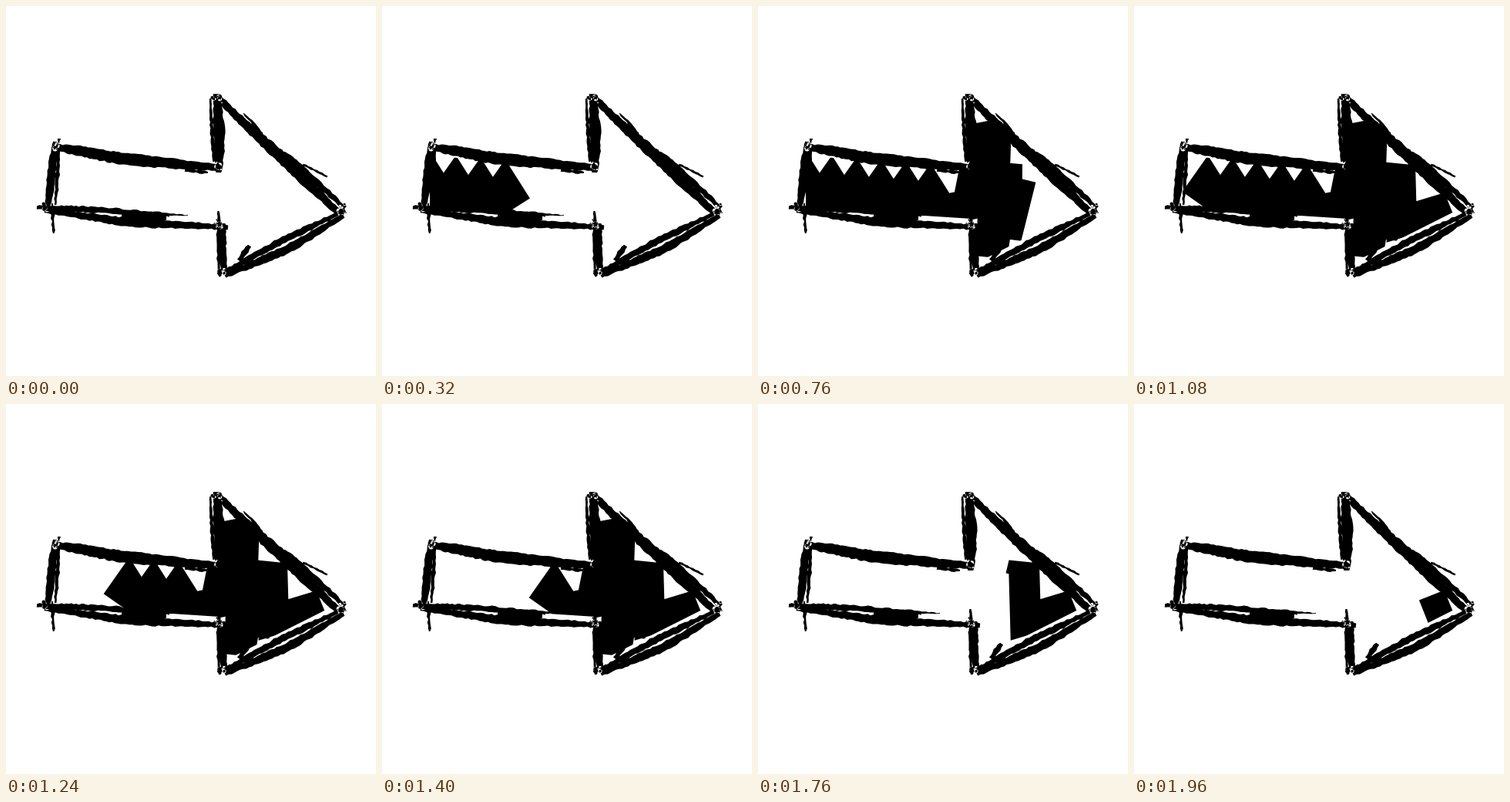
Recreate the animation shown at these times as an HTML page with a canvas. Size 480 px wide and 480 px high, loop 2000 ms.

```html
<!DOCTYPE html>
<html>
<head>
<meta charset="utf-8">
<style>
html, body { margin: 0; width: 100%; height: 100%; overflow: hidden; background: #fff; }
canvas { display: block; }
</style>
</head>
<body>
<canvas id="stage" width="480" height="480"></canvas>
<script>
const ctx = document.getElementById('stage').getContext('2d');
let seed = 7;
const rand = () => (seed = seed * 16807 % 2147483647) / 2147483647;
const spread = r => (rand() + rand() - 1) * r;
const parse = s => s.split(' ').map(p => p.split(',').map(Number));
const mix = (a, b, k) => a.map((v, i) => v + (b[i] - v) * k);

const ink = new Path2D();

// Rough brush mark along a bent line, widest in its middle
function brush(text, width) {
  const [a, b, c] = parse(text);
  const mid = c ? b : mix(a, b, .5), end = c || b;
  const length = Math.hypot(end[0] - a[0], end[1] - a[1]);
  const nx = (a[1] - end[1]) / length, ny = (end[0] - a[0]) / length;
  const n = Math.ceil(length / 4), near = [], far = [];
  for (let i = 0; i <= n; i++) {
    const s = i / n;
    const [x, y] = s < .5 ? mix(a, mid, s * 2) : mix(mid, end, s * 2 - 1);
    const half = width * (.3 + .25 * Math.sin(Math.PI * s));
    const p = half + spread(1.2), q = half + spread(1.2);
    near.push([x + nx * p, y + ny * p]);
    far.unshift([x - nx * q, y - ny * q]);
  }
  const mark = new Path2D();
  for (const p of near.concat(far)) mark.lineTo(...p);
  mark.closePath();
  ink.addPath(mark);
}

// Tail
brush('64,176 59,220 54,266', 10);
brush('69,172 67,215 64,258', 4);
brush('60,256 62,295', 4);
// Shaft
brush('60,182 150,198 276,210', 14);
brush('232,213 262,216', 4);
brush('40,261 110,264 212,271', 7);
brush('150,272 208,274', 12);
brush('50,265 160,281 288,287', 10);
brush('200,270 236,272', 2);
// Back of the head
brush('273,114 277,165 276,216', 13);
brush('265,120 267,160 270,202', 4);
brush('276,266 276,300 276,346', 5);
brush('282,282 281,315 283,350', 9);
// Upper slope
brush('273,118 355,195 432,269', 13);
brush('335,174 375,204 440,262', 8);
brush('308,139 333,165', 3);
brush('385,206 417,221', 3);
// Lower slope
brush('281,347 355,306 440,265', 8);
brush('284,350 365,316 438,272', 10);
brush('302,330 316,311', 7);

// Spatter around the corners
const corners = parse('66,183 50,261 273,119 274,208 434,266 281,346 278,284');
for (const [x, y] of corners) {
  for (let i = 0; i < 9; i++) {
    const r = .8 + rand() * 3, px = x + spread(14 - 3 * r), py = y + spread(14 - 3 * r);
    ink.moveTo(px + r, py);
    ink.arc(px, py, r, 0, 7);
  }
}

const inside = new Path2D('M62 194L275 212L277 128L425 262L280 335L277 276L62 262Z');

// Pen route as x, y, time: an even zigzag through the shaft, then rungs in the head
const route = [];
for (let i = 0; i < 13; i++) {
  const x = 47 + 16 * i;
  route.push([x, 250 + .08 * (x - 47) - i % 2 * 24, 40 * i]);
}
route.push(...parse('272,258,515 292,158,560 308,182,590 303,325,650 323,205,705 322,300,735 ' +
  '341,224,760 345,207,768 347,280,805 400,264,870 365,278,945 410,260,1000'));

function penAt(t) {
  const i = Math.max(1, route.findIndex(p => p[2] >= t));
  const a = route[i - 1], b = route[i];
  return mix(a, b, (t - a[2]) / (b[2] - a[2]));
}

function scribble(from, to) {
  if (to <= from) return;
  ctx.save();
  ctx.clip(inside);
  ctx.lineWidth = 40;
  ctx.miterLimit = 2.5;
  ctx.beginPath();
  for (const [x, y] of [penAt(from), ...route.filter(p => p[2] > from && p[2] < to), penAt(to)]) {
    ctx.lineTo(x, y);
  }
  ctx.stroke();
  ctx.restore();
}

const start = performance.now();
function loop() {
  const t = Math.floor((performance.now() - start) / 40) * 40 % 2000;
  ctx.clearRect(0, 0, 480, 480);
  // One second to draw, one second to erase from the same end
  scribble(Math.max(0, t - 1000), Math.min(1000, t));
  ctx.fill(ink);
  requestAnimationFrame(loop);
}
loop();
</script>
</body>
</html>
```
